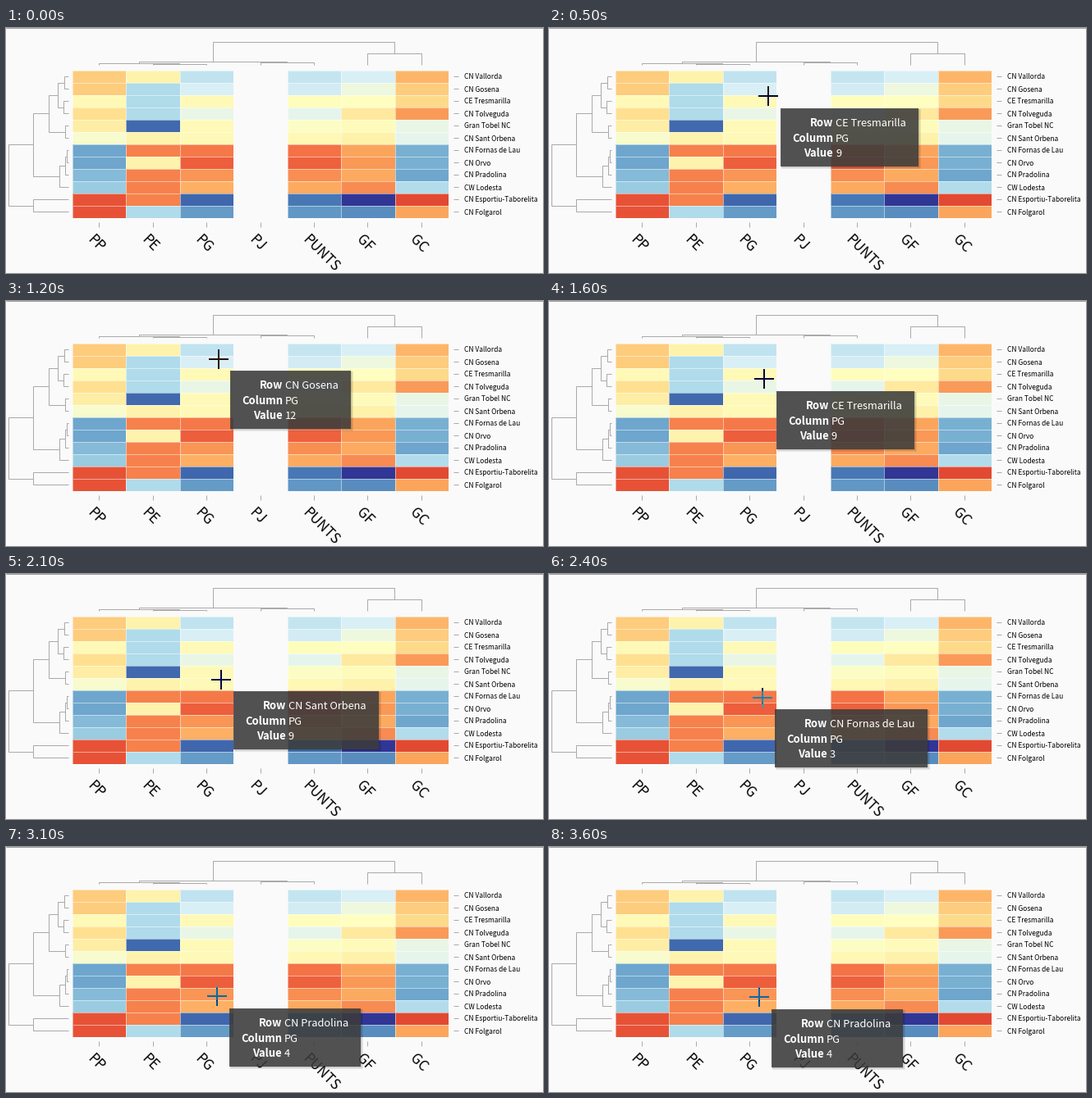
A matplotlib script for the animation above (4100 ms loop, 654 px wide and 299 px high).

```python
import numpy as np
import matplotlib.pyplot as plt
from matplotlib.animation import FuncAnimation
from matplotlib.patches import Rectangle

W, H, DPI = 654, 299, 64
PX = 72 / DPI                      # points per pixel
LEFT, TOP, CELL_W, CELL_H = 81, 52, 458 / 7, 15
BACK, LINE = "#fafafa", "#aaaaaa"
GAMES = 22
plt.rcParams["font.family"] = ["Noto Sans CJK JP", "DejaVu Sans"]

# team, wins, draws, goals for, goals against
TEAMS = [("CN Vallorda", 13, 3, 213, 152),
         ("CN Gosena", 12, 4, 202, 161),
         ("CE Tresmarilla", 9, 4, 190, 167),
         ("CN Tolveguda", 11, 4, 176, 142),
         ("Gran Tobel NC", 9, 5, 188, 205),
         ("CN Sant Orbena", 9, 3, 181, 208),
         ("CN Fornas de Lau", 3, 2, 145, 253),
         ("CN Orvo", 2, 3, 141, 253),
         ("CN Pradolina", 4, 2, 147, 257),
         ("CW Lodesta", 5, 2, 137, 230),
         ("CN Esportiu-Taborelita", 19, 2, 295, 114),
         ("CN Folgarol", 17, 4, 265, 145)]
ROWS = [team[0] for team in TEAMS]
won, drawn, scored, let_in = np.array([team[1:] for team in TEAMS]).T
STATS = {"PP": GAMES - won - drawn, "PE": drawn, "PG": won,
         "PJ": np.full(len(TEAMS), GAMES), "PUNTS": 3 * won + drawn,
         "GF": scored, "GC": let_in}
COLS = list(STATS)

# pointer path: step, x, y
PATH = np.array([
    (1, 481, 64), (4, 261, 88), (5, 267, 83), (9, 255, 56), (10, 255, 56),
    (12, 258.6, 70.6), (16, 262, 95), (21, 262, 128.6), (27, 258, 173),
    (28, 257, 169.6), (30, 258, 183), (32, 256, 181), (34, 256, 181),
    (36, 256, 183)])


def row_y(i):
    return TOP + CELL_H * (i + .5)


def col_x(j):
    return LEFT + CELL_W * (j + .5)


def heatmap():
    """Colour each column by its standard scores."""
    img = np.full((H, W, 3), 250 / 255)
    ramp = plt.get_cmap("RdYlBu")
    scores = {j: (v - v.mean()) / v.std()
              for j, v in enumerate(STATS.values()) if v.std() > 0}
    top = max(np.abs(z).max() for z in scores.values())
    for j, z in scores.items():
        x0, x1 = (round(LEFT + CELL_W * k) for k in (j, j + 1))
        for i, level in enumerate(.5 + z / top / 2):
            y = TOP + CELL_H * i
            color = np.array(ramp(level)[:3])
            img[y:y + CELL_H, x0:x1] = (1 + color) / 2
            img[y + 1:y + CELL_H, x0 + 1:x1] = color
    return img


fig = plt.figure(figsize=(W / DPI, H / DPI), dpi=DPI, facecolor=BACK)
ax = fig.add_axes([0, 0, 1, 1])
base = heatmap()
ax.imshow(base, extent=(0, W, H, 0), interpolation="nearest", aspect="auto")
ax.set(xlim=(0, W), ylim=(H, 0))
ax.set_autoscale_on(False)
ax.axis("off")


def stroke(xs, ys, color=LINE):
    # line snapping rounds up, so step back half a pixel
    ax.plot(np.array(xs) - .5, np.array(ys) - .5, color=color, lw=PX,
            solid_joinstyle="miter", solid_capstyle="butt")


def link(a, b, level, rows=False):
    """Join two dendrogram nodes and return the new node."""
    (p, s), (q, t) = a, b
    across, along = [p, p, q, q], [s, level, level, t]
    stroke(*((along, across) if rows else (across, along)))
    return (p + q) / 2, level


def label(x, y, s, size, color="black", **kw):
    return ax.text(x, y, s, fontsize=size * PX, color=color,
                   va="baseline", **kw)


def draw_trees():
    pp, pe, pg, pj, pts, gf, gc = [(col_x(j), 45.5) for j in range(7)]
    low = link(pp, link(pe, pg, 44.5), 43.5)
    low = link(low, link(pj, pts, 42.5), 41.5)
    link(low, link(gf, gc, 31.5), 17.5)

    r = [(row_y(i), 76) for i in range(12)]
    first = link(link(r[0], r[1], 71.5, True),
                 link(r[2], r[3], 70.5, True), 63.5, True)
    first = link(first, link(r[4], r[5], 72.5, True), 52.5, True)
    second = link(r[6], r[7], 74.5, True)
    second = link(second, r[8], 72.5, True)
    second = link(second, r[9], 65.5, True)
    upper = link(first, second, 33.5, True)
    link(upper, link(r[10], r[11], 33.5, True), 3.5, True)


def draw_labels():
    for i, name in enumerate(ROWS):
        stroke([545, 551], [row_y(i)] * 2)
        label(557.5, row_y(i) + 3, name, 8.4)
    for j, name in enumerate(COLS):
        x = col_x(j)
        stroke([x, x], [237, 243])
        label(x - 15, 259, name, 17, rotation=-45,
              rotation_mode="anchor", ha="left")


stroke([0, W + 1], [.5, .5], "#a0a0a0")
draw_trees()
draw_labels()

# pointer: a cross that inverts what lies below it
ARM = 12
cross = np.zeros((2 * ARM, 2 * ARM, 4))
cross[ARM - 1:ARM + 1, :, 3] = 1
cross[:, ARM - 1:ARM + 1, 3] = 1
pointer = ax.imshow(cross, extent=(0, 24, 24, 0), interpolation="nearest",
                    aspect="auto", zorder=4)

shadows = [ax.add_patch(Rectangle((0, 0), 1, 1, fc="black", ec="none",
                                  alpha=.07, zorder=5)) for _ in range(3)]
box = ax.add_patch(Rectangle((0, 0), 1, 1, fc="#3d3d3d", ec="none",
                             alpha=.85, zorder=6))
keys = [label(0, 0, s, 13, "white", weight="bold", ha="right", zorder=7)
        for s in ("Row", "Column", "Value")]
vals = [label(0, 0, "", 12.8, "white", ha="left", zorder=7) for _ in keys]
overlay = [pointer, box, *shadows, *keys, *vals]


def update(n):
    for art in overlay:
        art.set_visible(n > 0)
    if n == 0:
        return overlay
    fx, fy = (np.interp(n, PATH[:, 0], PATH[:, k]) for k in (1, 2))
    x, y = round(fx), round(fy)
    cross[..., :3] = 1 - base[y - ARM:y + ARM, x - ARM:x + ARM]
    pointer.set_data(cross)
    pointer.set_extent((x - ARM, x + ARM, y + ARM, y - ARM))

    i = (y - TOP) // CELL_H
    col = COLS[int((x - LEFT) / CELL_W)]
    left, top = int(fx) + 15, int(fy) + 15
    for k, text in enumerate((ROWS[i], col, str(STATS[col][i]))):
        line = top + 22 + 18.7 * k
        keys[k].set_position((left + 64, line))
        vals[k].set_position((left + 67, line))
        vals[k].set_text(text)
    w, h = round(82 + vals[0].get_window_extent().width), 71
    box.set_bounds(left, top, w, h)
    for k, rect in enumerate(shadows):
        rect.set_bounds(left + 1, top + 1, w + k, h + k)
    return overlay


anim = FuncAnimation(fig, update, frames=41, interval=100, repeat=True,
                     repeat_delay=0, init_func=lambda: update(0))
plt.show()
```
